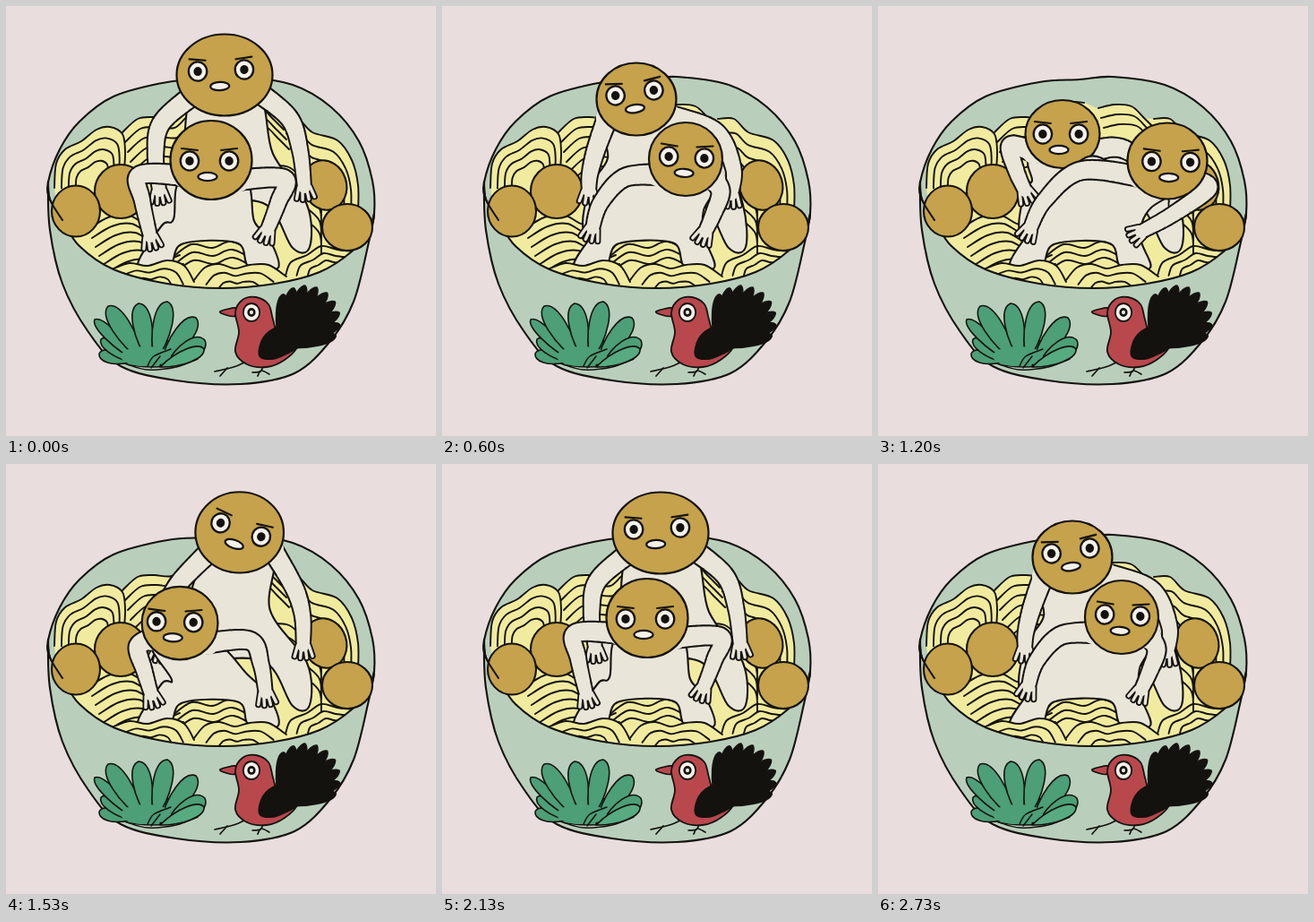
An HTML page with a canvas that plays this animation: 480 by 480 pixels, repeating every 2.79 s.

```html
<!DOCTYPE html>
<html lang="en">
<head>
<meta charset="utf-8">
<title>Noodle bowl dance</title>
<style>
html, body { margin: 0; width: 100%; height: 100%; overflow: hidden; background: #e9dddd; }
canvas { display: block; width: 100vw; height: 100vh; }
</style>
</head>
<body>
<canvas id="stage" width="480" height="480"></canvas>
<script>
const ctx = document.getElementById('stage').getContext('2d');
const INK = '#14120e', GOLD = '#c5a24b', SKIN = '#e9e5d9', NOODLE = '#f1eb9f',
      BOWL = '#b9cfbc', LEAF = '#4c9f76', RED = '#b9484d', WHITE = '#f4f1ea';
const LOOP = 2790, CYCLE = 17;

// ---------- drawing helpers ----------
function paint(fill, line = 2.1) {
  if (fill) { ctx.fillStyle = fill; ctx.fill(); }
  if (line) { ctx.strokeStyle = INK; ctx.lineWidth = line; ctx.stroke(); }
}

// smooth curve through x,y pairs
function curve(p, closed) {
  const n = p.length / 2;
  const at = (i, c) => p[2 * (closed ? (i + n) % n : Math.max(0, Math.min(n - 1, i))) + c];
  ctx.beginPath();
  ctx.moveTo(p[0], p[1]);
  for (let i = 0; i < (closed ? n : n - 1); i++) {
    const [x, y] = [0, 1].map(c => [
      at(i, c) + (at(i + 1, c) - at(i - 1, c)) / 6,
      at(i + 1, c) - (at(i + 2, c) - at(i, c)) / 6,
      at(i + 1, c)]);
    ctx.bezierCurveTo(x[0], y[0], x[1], y[1], x[2], y[2]);
  }
  if (closed) ctx.closePath();
}
function shape(p, fill, line) { curve(p, true); paint(fill, line); }
function stroke(p, line = 1.9) { curve(p); paint(null, line); }
function oval(x, y, rx, ry, fill, line, turn = 0) {
  ctx.beginPath();
  ctx.ellipse(x, y, rx, ry, turn, 0, Math.PI * 2);
  paint(fill, line);
}
function leaf(x0, y0, x1, y1, w, fill, line) {
  const dx = x1 - x0, dy = y1 - y0, len = Math.hypot(dx, dy);
  const nx = -dy / len * w, ny = dx / len * w;
  ctx.beginPath();
  ctx.moveTo(x0, y0);
  ctx.bezierCurveTo(x0 + dx * .45 + nx, y0 + dy * .45 + ny, x1 - dx * .05 + nx, y1 - dy * .05 + ny, x1, y1);
  ctx.bezierCurveTo(x1 - dx * .05 - nx, y1 - dy * .05 - ny, x0 + dx * .45 - nx, y0 + dy * .45 - ny, x0, y0);
  paint(fill, line);
}
function flip(p) {
  const out = [];
  for (let i = p.length - 2; i >= 0; i -= 2) out.push(p[i], p[i + 1]);
  return out;
}

// parallel strands, and strands shrinking towards a point
function bands(p, n, dx, dy) {
  for (let k = 0; k < n; k++) stroke(p.map((v, i) => v + k * (i % 2 ? dy : dx)));
}
function rings(p, n, cx, cy, step) {
  for (let k = 0; k < n; k++)
    stroke(p.map((v, i) => { const c = i % 2 ? cy : cx; return c + (v - c) * (1 - k * step); }));
}

// ---------- bowl ----------
const rim = [47,197, 49,216, 63,239, 82,268, 120,294, 180,310, 240,315, 300,310, 350,297, 386,274, 405,250, 411,232];
const brim = [60,160, 82,129, 120,101, 180,85, 225,82, 262,79, 320,88, 363,113, 394,151, 409,195];
const belly = [404,268, 388,330, 362,374, 322,410, 262,422, 190,418, 128,402, 92,364, 63,310, 49,250];
const leftTop = [54,203, 56,176, 66,160, 84,151, 101,138, 116,135, 130,143];
const midTop = [130,141, 147,126, 165,124, 185,125, 200,112, 215,107, 230,108];
const nextTop = [246,114, 264,110, 283,112, 296,124, 310,138];
const rightTop = [308,126, 326,126, 342,141, 370,150, 386,172, 393,200, 393,230];

function drawBack() {
  ctx.fillStyle = '#e9dddd';
  ctx.fillRect(0, 0, 480, 480);
  shape([...brim, ...flip(rim)], BOWL);
  curve([...leftTop, ...midTop, ...nextTop.slice(0, 8), ...rightTop, ...flip(rim.slice(4, 20))], true);
  paint(NOODLE, 0);
  rings([...leftTop, 133,162, 132,182], 4, 98, 205, .18);
  bands(midTop, 6, 3, 11);
  bands(nextTop, 3, 3, 11);
  rings(rightTop, 5, 340, 235, .15);
  bands([294,178, 316,180, 334,196, 350,212, 352,234], 4, 0, 14);
  bands([92,249, 114,236, 136,233, 158,244, 178,238], 6, 4, 10);
  bands([170,212, 188,204, 208,216], 3, 0, 16);
  bands([182,264, 205,248, 228,252, 250,245, 280,260], 5, 1, 9);
  rings([312,301, 318,286, 336,278, 352,268, 370,272, 388,274], 3, 362, 300, .25);
  oval(128, 207, 29, 30, GOLD);
  oval(356, 200, 24, 28, GOLD, 2.1, -.3);
}

function drawPlant() {
  const tips = [104,388, 106,372, 99,350, 114,335, 148,332, 180,330, 212,348, 222,373];
  oval(164, 388, 48, 15, LEAF, 1.5);
  for (let i = 0; i < 8; i++)
    leaf(136 + i * 6, 398 + (i > 5 ? 4 : 0), tips[2 * i], tips[2 * i + 1], i < 3 ? 9 : 14, LEAF, 1.6);
  oval(156, 391, 28, 11, LEAF, 0);
  leaf(172, 403, 221, 383, 10, '#56ab80', 1.6);
  stroke([135,400, 158,406, 190,403, 214,394], 1.5);
  stroke([158,402, 165,391, 184,383], 1.5);
  stroke([162,404, 172,391], 1.5);
}

function drawBird() {
  for (let a = -2.3; a < .6; a += .35)
    leaf(306, 381, 335 + 38 * Math.cos(a), 350 + 38 * Math.sin(a), 9, INK, 1.5);
  stroke([268,397, 254,403, 233,408], 1.7);
  stroke([247,404, 239,413], 1.7);
  stroke([287,402, 284,408, 275,409], 1.7);
  stroke([281,413, 285,407, 294,411], 1.7);
  shape([257,337, 239,341, 246,345, 256,346], RED, 1.6);
  shape([256,342, 264,328, 279,325, 293,333, 298,350, 304,366, 324,380, 311,395, 291,403, 269,400, 256,386, 260,364], RED, 1.8);
  shape([283,390, 287,371, 302,359, 317,361, 328,378, 311,389, 296,394], INK);
  oval(274, 342, 9.2, 10, WHITE, 1.8);
  oval(274, 342, 4.6, 5, INK, 0);
  oval(274, 342, 2, 2.2, WHITE, 0);
}

function drawFront() {
  const clumps = [
    [[118,294, 138,287, 158,290, 180,284, 199,290, 210,308], 165, 318],
    [[210,306, 222,292, 238,288, 255,293, 272,289, 293,289, 313,302], 260, 324]];
  for (const [p, cx, cy] of clumps) {
    curve(p);
    paint(NOODLE, 0);
    rings(p, 3, cx, cy, .27);
  }
  shape([...rim, ...belly], BOWL);
  oval(78, 229, 27, 28.5, GOLD);
  stroke(rim.slice(0, 6), 2.1);
  oval(381, 247, 28, 26, GOLD);
  drawPlant();
  drawBird();
}

// ---------- dancers ----------
// heads: centre, radii, point between the eyes, tilt
// limbs: left and right flank, then elbow, forearm and wrist of each arm
const KEYS = [0, 3, 6, 9, 11, 14];
const front = {
  heads: [
    [229,172, 45.5,44, 227,173, 0],
    [183,173, 41.5,39.5, 177,170, .05],
    [196,108, 47,42.5, 197,99, .21],
    [277,83, 48,46, 279,76, .5],
    [323,173, 44.5,42.5, 327,174, .02],
    [272,171, 41,41, 273,169, .05]],
  limbs: [
    [187,238, 277,240, 149,189, 152,217, 161,257, 311,193, 304,219, 292,250],
    [184,235, 268,232, 150,208, 157,235, 163,257, 255,199, 275,225, 288,257],
    [176,195, 262,215, 157,180, 160,220, 163,258, 243,190, 263,225, 280,252],
    [222,180, 288,190, 208,155, 186,200, 170,238, 309,165, 301,205, 291,248],
    [232,169, 305,225, 226,184, 186,217, 170,248, 368,204, 330,232, 294,252],
    [200,188, 292,228, 203,192, 177,220, 168,248, 311,208, 303,232, 294,252]],
  feet: [147,290, 182,291, 271,291, 304,292],
  hips: [174,245, 293,258],
  neck: [-32,20, 36,20],
  shoulders: [-31,17, 31,22],
  crotch: y => [197, 238 + y * .16, 232 + y * .15, 237 + y * .16]
};
const back = {
  heads: [
    [244,77, 53.5,45.5, 240,72, -.04],
    [270,85, 47,44.5, 274,83, .43],
    [305,156, 46.5,42.5, 310,155, 0],
    [252,172, 42,40, 253,172, 0],
    [206,143, 41.5,38, 204,143, 0],
    [217,104, 44.5,40.5, 215,97, -.14]],
  limbs: [
    [196,160, 298,165, 174,130, 167,165, 171,206, 316,125, 328,160, 333,202],
    [205,150, 299,165, 203,138, 182,170, 172,206, 328,145, 334,175, 331,203],
    [222,140, 345,190, 240,134, 185,185, 172,206, 369,150, 352,180, 333,201],
    [190,190, 318,185, 182,187, 166,199, 164,210, 318,172, 330,192, 331,206],
    [172,195, 300,168, 148,156, 154,183, 164,206, 275,160, 325,195, 333,218],
    [185,170, 312,165, 172,160, 165,188, 164,206, 305,140, 325,180, 323,210]],
  feet: [158,250, 185,255, 320,270, 339,269],
  hips: [165,202, 336,222],
  neck: [-34,25, 36,22],
  shoulders: [-32,20, 36,18],
  crotch: () => [208, 225, 287, 220]
};

// periodic cubic between key poses
function poseAt(keys, d) {
  const n = KEYS.length;
  const when = i => KEYS[(i + n) % n] + CYCLE * Math.floor(i / n);
  const row = i => keys[(i + n) % n];
  let i = n - 1;
  while (KEYS[i] > d) i--;
  const h = when(i + 1) - when(i), u = (d - when(i)) / h, v = 1 - u;
  return row(i).map((a, k) => {
    const b = row(i + 1)[k];
    const ta = (b - row(i - 1)[k]) / (when(i + 1) - when(i - 1)) * h;
    const tb = (row(i + 2)[k] - a) / (when(i + 2) - when(i)) * h;
    return v * v * (1 + 2 * u) * a + u * v * v * ta + u * u * (3 - 2 * u) * b - u * u * v * tb;
  });
}

function drawHand(x, y, angle) {
  for (const [w, colour] of [[7, INK], [3.4, SKIN]]) {
    ctx.strokeStyle = colour;
    ctx.lineWidth = w;
    ctx.beginPath();
    for (let i = -1.5; i < 2; i++) {
      const a = angle - i * .2, s = i * 4.2, len = 15 - Math.abs(i) * 1.5;
      const fx = x + Math.sin(angle) * s, fy = y - Math.cos(angle) * s;
      ctx.moveTo(fx, fy);
      ctx.lineTo(fx + Math.cos(a) * len, fy + Math.sin(a) * len);
    }
    ctx.stroke();
  }
}

function drawArm(p) {
  const pt = i => { i = Math.max(0, Math.min(3, i)); return [p[2 * i], p[2 * i + 1]]; };
  const dots = [];
  for (let s = 0; s <= 72; s++) {
    const i = Math.min(2, Math.floor(s / 24)), t = s / 24 - i;
    const [a, b, c, d] = [pt(i - 1), pt(i), pt(i + 1), pt(i + 2)];
    const mix = k => b[k] + .5 * t * (c[k] - a[k] + t * (2 * a[k] - 5 * b[k] + 4 * c[k] - d[k]
      + t * (3 * (b[k] - c[k]) + d[k] - a[k])));
    dots.push([mix(0), mix(1), 12 - s / 18]);
  }
  const stamp = (grow, colour) => {
    ctx.fillStyle = colour;
    ctx.beginPath();
    for (const [x, y, r] of dots) {
      ctx.moveTo(x + r + grow, y);
      ctx.arc(x, y, r + grow, 0, Math.PI * 2);
    }
    ctx.fill();
  };
  stamp(1, INK);
  drawHand(p[6], p[7], Math.atan2(p[7] - p[5], p[6] - p[4]));
  stamp(-1, SKIN);
  oval(p[0], p[1], 13.2, 13.2, SKIN, 0);
}

function drawHead([x, y, rx, ry, ex, ey, tilt]) {
  oval(x, y, rx, ry, GOLD, 2.2);
  ctx.save();
  ctx.translate(ex, ey);
  ctx.rotate(tilt);
  for (const side of [-1, 1]) {
    const gap = side * rx * .485;
    oval(gap, 0, 10.2, 10.6, WHITE, 2.3);
    oval(gap, 0, 4.7, 5, INK, 0);
    stroke([gap - 9, -13 + side, gap + 9, -13 - side], 2.1);
  }
  oval(-2, 17.5, 10.5, 4.6, WHITE, 2.2);
  ctx.restore();
}

function drawDancer(who, d) {
  const head = poseAt(who.heads, d), limb = poseAt(who.limbs, d);
  const place = p => p.map((v, i) => v + head[i % 2]);
  const neck = place(who.neck), arm = place(who.shoulders);
  const { feet, hips } = who;
  shape([
    ...neck.slice(0, 2), ...limb.slice(0, 2), ...hips.slice(0, 2), ...feet.slice(0, 4),
    ...who.crotch(head[1]),
    ...feet.slice(4), ...hips.slice(2), ...limb.slice(2, 4), ...neck.slice(2)], SKIN);
  drawArm([...arm.slice(0, 2), ...limb.slice(4, 10)]);
  drawArm([...arm.slice(2), ...limb.slice(10)]);
  drawHead(head);
}

// ---------- clock ----------
function drawingAt(t) {
  let k = Math.ceil(t * .015) + 1;
  while (Math.round(k * 20 / 3) * 10 > t) k--;
  const d = Math.floor(k * 1.6 + 1e-6) % CYCLE;
  return d === 5 ? 6 : d;          // one drawing is held twice
}

let shown = -1;
function frame() {
  const d = drawingAt(performance.now() % LOOP);
  if (d !== shown) {
    shown = d;
    ctx.lineJoin = ctx.lineCap = 'round';
    drawBack();
    drawDancer(back, d);
    drawDancer(front, d);
    drawFront();
  }
  requestAnimationFrame(frame);
}
frame();
</script>
</body>
</html>
```
